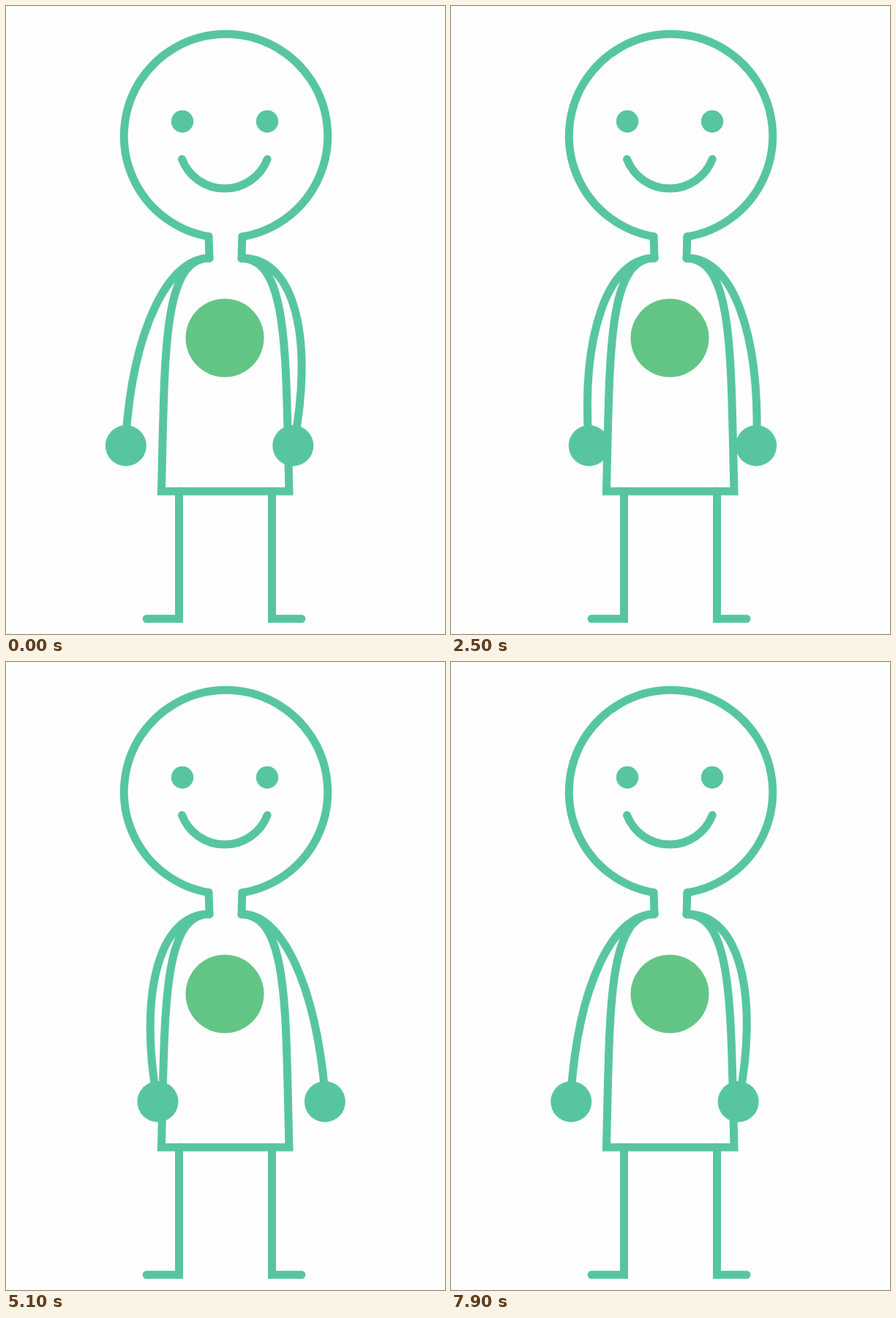
An HTML page with a canvas for the animation above (8000 ms loop, 600 by 857 pixels).

```html
<!DOCTYPE html>
<html lang="en">
<head>
<meta charset="utf-8">
<title>Swinging arms</title>
<style>
  html, body { margin: 0; width: 100%; height: 100%; overflow: hidden; background: #fffeff; }
  canvas { display: block; }
</style>
</head>
<body>
<canvas id="stage" width="600" height="857"></canvas>
<script>
const ctx = document.getElementById('stage').getContext('2d');
const GREEN = '#57c6a0';
const BADGE = '#62c586';
const STEP = 100, LOOP = 8000, SWING = 1000, LEAD = 30;

// Bezier handles as [hand out, hand in]; the right arm is mirrored
const LEFT = { x: v => v, upper: [222, 206], lower: [174, 182] };
const RIGHT = { x: v => 601.2 - v, upper: [225, 204], lower: [178, 181] };

const lerp = ([a, b], p) => a + (b - a) * p;

// Cubic ease-in-out with handles at .42 and .58
function ease(x) {
  let lo = 0, hi = 1;
  for (let i = 0; i < 24; i++) {
    const s = (lo + hi) / 2, r = 1 - s;
    if (3 * r * r * s * 0.42 + 3 * r * s * s * 0.58 + s * s * s < x) lo = s;
    else hi = s;
  }
  return lo * lo * (3 - 2 * lo);
}

function dot(x, y, r, color = GREEN) {
  ctx.fillStyle = color;
  ctx.beginPath();
  ctx.arc(x, y, r, 0, Math.PI * 2);
  ctx.fill();
}

function line(path, join = 'round') {
  ctx.lineJoin = join;
  ctx.stroke(new Path2D(path));
}

function body() {
  line('M277 314.6 A139.2 139.2 0 1 1 324 314.6');
  line('M277 314.5 L278 344');
  line('M322.8 314.5 L322 344.5');
  line('M278 344 C213 344 217.3 480 212.4 662.3 L387 662.3 C382 480 387 345 322 344.5', 'miter');
  line('M236.5 662 V836.3 H192', 'miter');
  line('M363.5 662 V836.3 H404', 'miter');
}

function face() {
  dot(241, 157.5, 15.2);
  dot(357, 157.5, 15.2);
  line('M240.5 209 A62.5 62.5 0 0 0 357.2 209');
}

// p runs from 0 (hand away from the body) to 1 (hand against it)
function arm({ x, upper, lower }, p) {
  ctx.beginPath();
  ctx.moveTo(x(278), 344);
  ctx.bezierCurveTo(x(lerp(upper, p)), 344,
                    x(lerp(lower, p)), lerp([440, 460], p),
                    x(lerp([163.5, 208], p)), lerp([590, 598], p));
  ctx.stroke();
  dot(x(lerp([163.8, 209], p)), 600, 28);
}

function draw(time) {
  const t = Math.floor((time + 10) / STEP) * STEP % LOOP + LEAD;
  const k = ease(t % SWING / SWING);
  const p = Math.floor(t / SWING) % 2 ? 1 - k : k;

  ctx.fillStyle = '#fffeff';
  ctx.fillRect(0, 0, 600, 857);
  ctx.strokeStyle = GREEN;
  ctx.lineWidth = 11;
  ctx.lineCap = 'round';
  body();
  face();
  dot(299, 453, 53.5, BADGE);
  arm(LEFT, p);
  arm(RIGHT, 1 - p);
}

const start = performance.now();
function tick() {
  draw(performance.now() - start);
  requestAnimationFrame(tick);
}
tick();
</script>
</body>
</html>
```
